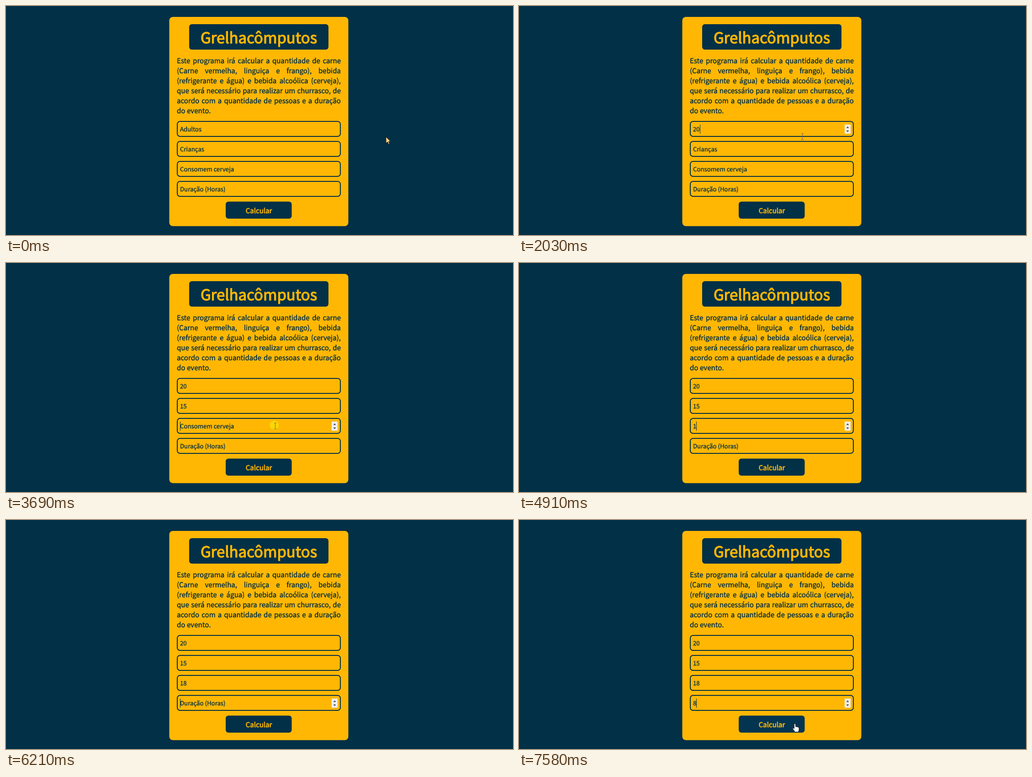
Animation, 1110 px wide and 504 px high, one loop 8000 ms. Source, as an HTML page:

```html
<!DOCTYPE html>
<html lang="pt-BR">
<head>
<meta charset="utf-8">
<title>Grelhacômputos</title>
<style>
  :root { --navy: #023047; --amber: #ffb703; }
  html, body { margin: 0; width: 100%; height: 100%; overflow: hidden; background: var(--navy); }
  body { position: relative; }
  svg { position: absolute; left: 0; top: 0; display: block; }
  svg, p {
    font-family: "Noto Sans CJK JP", "Noto Sans CJK SC", "Noto Sans CJK", "Open Sans", sans-serif;
    font-weight: 400;
    text-rendering: geometricPrecision;
  }
  p {
    position: absolute; left: 374px; top: 108.6px; width: 359px; margin: 0;
    font-size: 15.1px; line-height: 22.1px; color: var(--navy);
    -webkit-text-stroke: .4px var(--navy);
  }
  p span { display: block; white-space: nowrap; text-align: justify; text-align-last: justify; }
  p span:last-child { text-align-last: left; }
  .card, .heading { fill: var(--amber); }
  .heading { text-anchor: middle; stroke: var(--amber); }
  .title { font-size: 32.9px; stroke-width: 1.3px; }
  .action { font-size: 15px; stroke-width: .7px; }
  .panel, .caret { fill: var(--navy); }
  .box { fill: none; stroke: var(--navy); stroke-width: 2; }
  .label { font-size: 13.25px; fill: var(--navy); stroke: var(--navy); stroke-width: .35px; }
  .ibeam { fill: none; stroke: #666a68; }
  .arrow, .hand { fill: #fff; stroke: #111; stroke-width: .8; stroke-linejoin: round; }
</style>
</head>
<body>
<svg width="1110" height="504" viewBox="0 0 1110 504">
  <rect class="card" x="357.5" y="24" width="392" height="460.5" rx="8"/>
  <rect class="panel" x="401" y="40" width="305" height="56" rx="6"/>
  <text class="heading title" x="553.5" y="82">Grelhacômputos</text>
  <g id="fields"></g>
  <rect class="panel" id="button" x="481" y="430.5" width="144.5" height="37.5" rx="6"/>
  <text class="heading action" x="553.5" y="456">Calcular</text>
</svg>
<p>
  <span>Este programa irá calcular a quantidade de carne</span>
  <span>(Carne vermelha, linguiça e frango), bebida</span>
  <span>(refrigerante e água) e bebida alcoólica (cerveja),</span>
  <span>que será necessário para realizar um churrasco, de</span>
  <span>acordo com a quantidade de pessoas e a duração</span>
  <span>do evento.</span>
</p>
<svg width="1110" height="504" viewBox="0 0 1110 504">
  <g id="pointer">
    <circle id="click" cx="-2" cy="-1" r="10" fill="#fdd503"/>
    <path class="ibeam" d="M-3-6.5H-1L0-6L1-6.5H3M0-6V6M-3 6.5H-1L0 6L1 6.5H3" transform="translate(.5 .5)"/>
    <path class="arrow" d="M0 0V14L3.3 11L5.6 16L7.8 15L5.6 10H9.8Z"/>
    <path class="hand" d="M-1.5 1.3Q0-.6 1.5 1.3V7L3 6.5L4.5 7.5L6 7.2L7.3 8.5L9 9V13.5L7.5 18.5H.3L-2.5 14.5L-5 11Q-4.5 9-1.5 11.2Z"/>
  </g>
</svg>
<script>
const LOOP = 8000, BLINK = 545, CLICK = 140, KEY_GAP = 70;
const SETTLE = 130;     // pointer rests this long before a click
const HIDE_LEAD = 300;  // pointer vanishes this long before typing
const RESUME = 140;     // and moves on this long after the first key

// Each stop: when it is clicked and typed into, where the pointer rests, how its way there bends
const rows = [
  { hint: 'Adultos', value: '20', focus: 1090, typed: 1680, rest: [626, 275], bend: [834, 309] },
  { hint: 'Crianças', value: '15', focus: 2450, typed: 3200, rest: [600, 321], bend: [624, 283] },
  { hint: 'Consomem cerveja', value: '18', focus: 3690, typed: 4910, rest: [589, 358], bend: [594, 338] },
  { hint: 'Duração (Horas)', value: '8', focus: 5670, typed: 6470, rest: [581, 413], bend: [581, 520] }
];
const stops = [...rows, { focus: 7350, rest: [604, 448], bend: [591, 404] }];
const start = { typed: 250 - RESUME, rest: [832, 288] };

const byId = id => document.getElementById(id);
const show = (el, on) => el.style.display = on ? '' : 'none';
const within = (t, from, to) => t >= from && t < to;

function pointerAt(t) {
  const departed = stops.filter((stop, i) => i > 0 && t >= stops[i - 1].typed + RESUME).length;
  const from = stops[departed - 1] || start, to = stops[departed];
  const begin = from.typed + RESUME, end = to.focus - SETTLE;
  const u = Math.min(1, Math.max(0, (t - begin) / (end - begin)));
  return [0, 1].map(axis => Math.round(
    (1 - u) ** 2 * from.rest[axis] + 2 * u * (1 - u) * to.bend[axis] + u * u * to.rest[axis]));
}

rows.forEach((row, i) => {
  row.top = 253 + 44 * i;
  const g = document.createElementNS('http://www.w3.org/2000/svg', 'g');
  g.setAttribute('transform', `translate(374 ${row.top})`);
  g.innerHTML = `
    <rect class="box" x="1" y="1" width="357" height="33" rx="6"/>
    <text class="label" x="7" y="23"></text>
    <rect class="caret" y="8" width="1" height="20"/>
    <g class="spin"><rect x="339" y="8" width="13" height="20" fill="#efefef"/>
    <path d="M342.5 15.5L345.5 12L348.5 15.5ZM342.5 21L345.5 24.5L348.5 21Z" fill="#444"/></g>`;
  byId('fields').append(g);
  for (const part of ['label', 'caret', 'spin']) row[part] = g.querySelector('.' + part);
});

const pointer = byId('pointer');
const [ibeam, arrow, hand] = ['.ibeam', '.arrow', '.hand'].map(s => pointer.querySelector(s));

function draw(t) {
  const [x, y] = pointerAt(t);
  const inRow = (row, height) => x > 374 && x < 733 && within(y, row.top, row.top + height);
  const overField = rows.some(row => inRow(row, 35));
  const overButton = x > 481 && x < 625 && y > 430 && y < 468;
  const focused = rows.filter(row => row.focus <= t).pop();

  for (const row of rows) {
    const keys = t < row.typed ? 0 : Math.min(row.value.length, 1 + Math.floor((t - row.typed) / KEY_GAP));
    const lastInput = keys ? row.typed + (keys - 1) * KEY_GAP : row.focus;
    row.label.textContent = row.value.slice(0, keys) || row.hint;
    row.caret.setAttribute('x', 7 + Math.round(7.45 * keys));
    show(row.caret, row === focused && Math.floor((t - lastInput) / BLINK) % 2 === 0);
    show(row.spin, row === focused || inRow(row, 33));
  }

  byId('button').style.fill = overButton ? '#033550' : '';
  pointer.setAttribute('transform', `translate(${x} ${y})`);
  show(pointer, !rows.some(row => within(t, row.typed - HIDE_LEAD, row.typed + RESUME)));
  show(byId('click'), rows.some(row => within(t, row.focus, row.focus + CLICK)));
  show(ibeam, overField);
  show(hand, overButton);
  show(arrow, !overField && !overButton);
  arrow.style.fill = x > 749 ? '#ffd98a' : '';
}

function frame() {
  draw(performance.now() % LOOP);
  requestAnimationFrame(frame);
}
frame();
</script>
</body>
</html>
```
